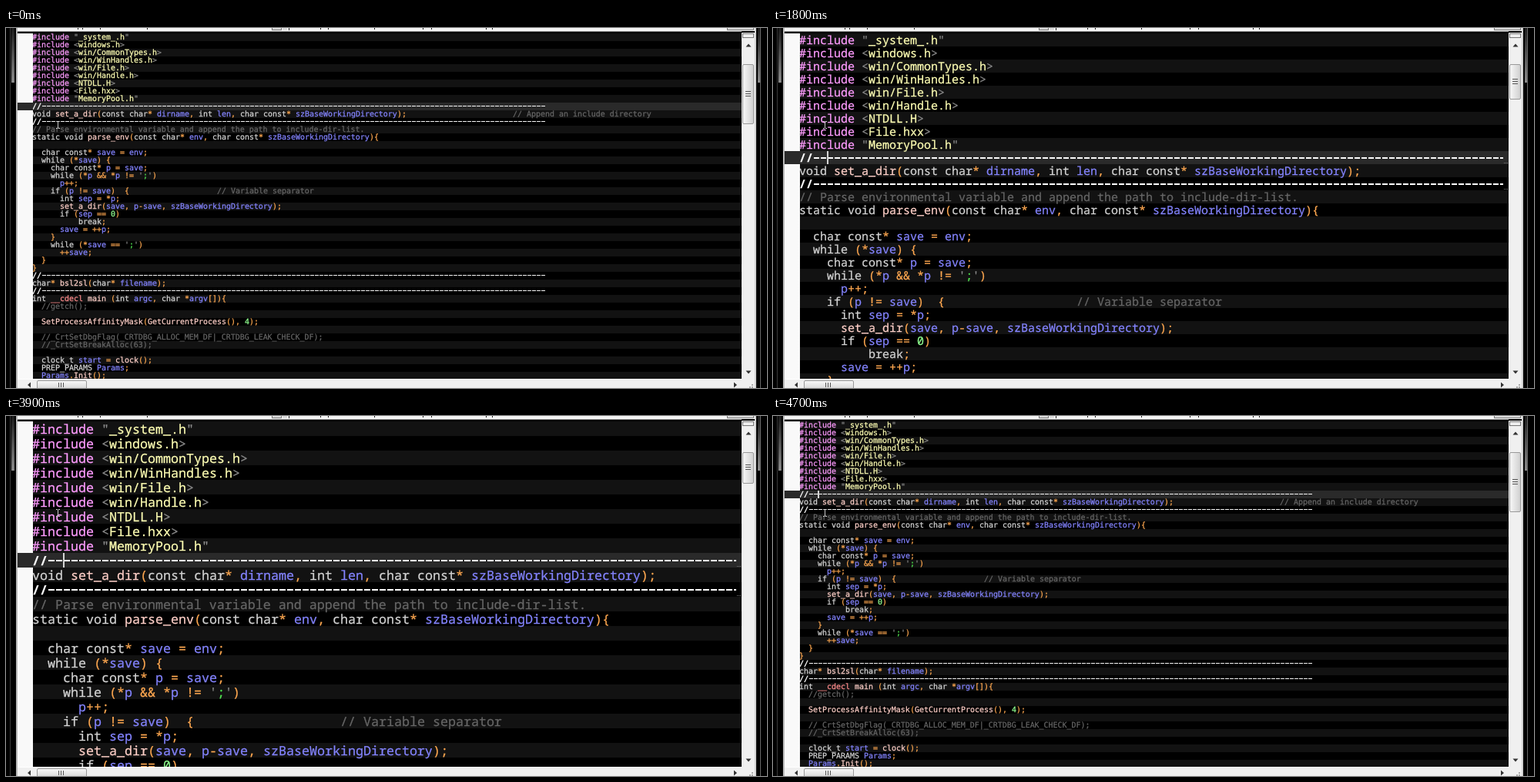
Recreate the animation shown at these times as an HTML page. Size 988 px wide and 468 px high, loop 5200 ms.

```html
<!DOCTYPE html>
<html lang="en">
<head>
<meta charset="utf-8">
<title>Editor zoom</title>
<style>
html, body { margin: 0; width: 100%; height: 100%; overflow: hidden; background: #000; }
svg { display: block; }
text { white-space: pre; text-rendering: geometricPrecision; }
tspan { fill: currentColor; stroke: currentColor; stroke-width: .25px; }
.grid { font-family: "DejaVu Sans Mono", monospace; }
.smooth { font-family: "Noto Sans Mono", monospace; }
.rule { color: #fff; font-weight: bold; }
.note { color: #666; }
.pre { color: #ff9cff; }
.path { color: #ffffb4; }
.edge { color: #8a8a8a; }
.chr { color: #50e650; }
.num { color: #90ff90; }
.key { color: #d4d4d4; }
.fn { color: #ffd0c8; }
.attr { color: #ff8c8c; }
.id { color: #8484ff; }
.op { color: #ffa850; }
</style>
</head>
<body>
<svg id="stage" width="988" height="468" viewBox="0 0 988 468">
  <defs>
    <clipPath id="page"><rect x="35" y="7" width="920" height="449"/></clipPath>
    <clipPath id="words"><rect x="35" y="7" width="913" height="449"/></clipPath>
    <linearGradient id="glass" x2="0" y2="1">
      <stop offset="0" stop-color="#1a1a1a"/><stop offset="1" stop-color="#8a8a8a"/>
    </linearGradient>
    <linearGradient id="thumbV"><stop offset="0" stop-color="#f8f8f8"/><stop offset="1" stop-color="#cfcfcf"/></linearGradient>
    <linearGradient id="thumbH" x2="0" y2="1"><stop offset="0" stop-color="#f8f8f8"/><stop offset="1" stop-color="#cfcfcf"/></linearGradient>
    <pattern id="dots" width="2" height="2" patternUnits="userSpaceOnUse">
      <rect width="2" height="2" fill="#fff"/><path d="M0 0h1v1h-1zM1 1h1v1h-1z" fill="#f3f3f3"/>
    </pattern>
  </defs>
  <rect width="988" height="468"/>
  <g id="chrome"></g>
  <g id="views"></g>
  <rect id="caret" width="2" fill="#d5d5d5"/>
  <path d="M65 121.5h2m1 0h2M67.5 122v8M65 130.5h2m1 0h2" stroke="#c8c8c8" fill="none"/>
</svg>
<script>
const NS = "http://www.w3.org/2000/svg";
const LEFT = 34, TOP = 7, CURRENT = 9, LOOP = 5200;
const $ = id => document.getElementById(id);

function add(parent, tag, attrs, text) {
  const el = document.createElementNS(NS, tag);
  for (const k in attrs) el.setAttribute(k, attrs[k]);
  if (text !== undefined) el.textContent = text;
  return parent.appendChild(el);
}
const box = (parent, x, y, width, height, fill, more) =>
  add(parent, "rect", { x, y, width, height, fill, ...more });

const rule = "//" + "-".repeat(109);
const code = `#include "_system_.h"
#include <windows.h>
#include <win/CommonTypes.h>
#include <win/WinHandles.h>
#include <win/File.h>
#include <win/Handle.h>
#include <NTDLL.H>
#include <File.hxx>
#include "MemoryPool.h"
${rule}
${"void set_a_dir(const char* dirname, int len, char const* szBaseWorkingDirectory);".padEnd(104)}// Append an include directory
${rule}
// Parse environmental variable and append the path to include-dir-list.
static void parse_env(const char* env, char const* szBaseWorkingDirectory){

  char const* save = env;
  while (*save) {
    char const* p = save;
    while (*p && *p != ';')
      p++;
${"    if (p != save)  {".padEnd(40)}// Variable separator
      int sep = *p;
      set_a_dir(save, p-save, szBaseWorkingDirectory);
      if (sep == 0)
          break;
      save = ++p;
    }
    while (*save == ';')
      ++save;
  }
}
${rule}
char* bsl2sl(char* filename);
${rule}
int __cdecl main (int argc, char *argv[]){
  //getch();

  SetProcessAffinityMask(GetCurrentProcess(), 4);

  //_CrtSetDbgFlag(_CRTDBG_ALLOC_MEM_DF|_CRTDBG_LEAK_CHECK_DF);
  //_CrtSetBreakAlloc(63);

  clock_t start = clock();
  PREP_PARAMS Params;
  Params.Init();`.split("\n");

const keywords = /^(void|const|char|int|static|while|if|break|clock_t|PREP_PARAMS)$/;
const pieces = /\/\/.*|#\w+|<[\w\/.]+>|"[^"]*"|'[^']*'|\d+|\w+|[^\s\w]+?(?=[\s\w\/"']|$)/g;

function kind(word, rest) {
  if (word.startsWith("//")) return "note";
  if (word[0] === "#") return "pre";
  if (/^\d/.test(word)) return "num";
  if (!/^\w/.test(word)) return "op";
  if (keywords.test(word)) return "key";
  if (word === "__cdecl") return "attr";
  return /^ ?\(/.test(rest) ? "fn" : "id";
}

// Splits a line into [column, text, class]
function tokens(line) {
  if (line === rule) return [[0, "//", "rule"]];
  const out = [];
  for (const m of line.matchAll(pieces)) {
    const word = m[0], at = m.index, end = word.length - 1;
    if (end > 1 && /^[<"']/.test(word)) {
      out.push([at, word[0], "edge"],
               [at + 1, word.slice(1, -1), word[0] === "'" ? "chr" : "path"],
               [at + end, word[end], "edge"]);
    } else out.push([at, word, kind(word, line.slice(at + word.length))]);
  }
  return out;
}
const parsed = code.map(tokens);

// Character width, line height, baseline offset, font
const levels = [
  [6, 10, 8, "grid"],
  [7, 13, 10, "smooth"],
  [8, 15, 12, "smooth"],
  [9, 17, 14, "smooth"],
  [10, 19, 16, "smooth"],
  [12, 20, 16, "grid"]
];

// The dashes that follow the two slashes of a divider
function dashes(parent, w, y) {
  const dash = Math.round(w * .75), thick = w < 8 ? 1 : 2;
  add(parent, "path", {
    d: `M${LEFT + 2 * w + 1} ${y + thick / 2}H${LEFT + rule.length * w}`,
    stroke: "#fff", "stroke-width": thick, "stroke-dasharray": `${dash} ${w - dash}`
  });
}

function buildView([w, h, base, font]) {
  const g = add($("views"), "g", { class: font });
  const page = add(g, "g", { "clip-path": "url(#page)" });
  const size = w / (font === "grid" ? 0.602 : 0.6);
  const text = add(g, "g", { "clip-path": "url(#words)", "font-size": size });
  const rows = Math.ceil(449 / h);
  for (let i = 0; i < rows; i++) {
    const y = TOP + i * h;
    if (i % 2 === 0) box(page, 35, y, 920, h, "#121212");
    if (i === CURRENT) {
      box(page, 35, y, 920, h, "#2a2a2a");
      box(g, 15, y, 20, h, "#2a2a2a");
    }
    const line = add(text, "text", { y: y + base });
    for (const [col, word, cls] of parsed[i] || [])
      add(line, "tspan", { x: LEFT + col * w, class: cls }, word);
    if (code[i] === rule) dashes(text, w, y + Math.floor(base * .6));
    const cut = Math.floor((948 - LEFT) / w);
    if (code[i] && code[i].length > cut && code[i][cut] !== " ")
      for (let x = 949; x < 955; x += 2) box(page, x, y + h - 2, 1, 1, "#777");
  }
  const len = Math.round(780 / h), mid = 47 + (len >> 1);
  box(g, 956.5, 47.5, 14, len - 1, "url(#thumbV)", { rx: 1.5, stroke: "#999" });
  for (const d of [-4, -1, 2]) box(g, 960, mid + d, 7, 1, "#555");
  return g;
}

function buildChrome() {
  const g = $("chrome");
  box(g, 5, 0, 1, 468, "#3a3a3a");
  box(g, 7, 0, 4, 71, "url(#glass)");
  box(g, 13, 0, 2, 468, "#b8b8b8");
  box(g, 972, 0, 2, 468, "#d0d0d0");
  box(g, 976, 0, 4, 71, "url(#glass)");
  box(g, 979, 0, 1, 468, "#666");
  box(g, 15, 0, 957, 4, "#f4f4f4");
  box(g, 15, 4, 940, 1, "#888");
  box(g, 359, 0, 6, 3, "#ddd");
  box(g, 367, 0, 1, 3, "#222");
  for (const [x, w] of [[345, 12], [936, 34]])
    box(g, x + .5, -3.5, w, 6, "#ddd", { stroke: "#777" });
  for (const x of [93, 99, 122, 183, 408, 418, 478, 541, 552, 623, 631])
    box(g, x, 0, 1, 2, "#222");
  box(g, 15, 7, 20, 449, "url(#dots)");
  box(g, 955, 6, 17, 462, "#f0f0f0");
  box(g, 956.5, 7.5, 14, 5, "#eee", { stroke: "#777" });
  box(g, 15, 456, 957, 12, "#f0f0f0");
  box(g, 15, 456, 940, 1, "#fff");
  box(g, 40.5, 458.5, 64, 14, "url(#thumbH)", { rx: 1.5, stroke: "#999" });
  for (const x of [68, 71, 74]) box(g, x, 461, 1, 6, "#555");
  add(g, "path", {
    d: "M964 20.5l3.5 4h-7zM964 449.5l3.5-4h-7zM28 464l4-3.5v7zM949 464l-4-3.5v7z",
    fill: "#333"
  });
  for (const [x, y] of [[968, 463], [965, 466], [968, 466]]) box(g, x, y, 2, 2, "#aaa");
}

buildChrome();
const views = levels.map(buildView);
const caret = $("caret");

function zoomAt(t) {
  if (t < 1400) return 0;
  if (t < 2200) return 1 + Math.floor((t - 1400) / 200);
  if (t < 3900) return 5;
  return Math.max(0, 4 - Math.floor((t - 3900) / 200));
}
const hidden = [[0, 500], [1000, 1200], [2400, 2900], [3400, 3900]];

function draw(t) {
  const level = zoomAt(t), [w, h] = levels[level];
  views.forEach((v, i) => v.setAttribute("display", i === level ? "inline" : "none"));
  const off = hidden.some(([a, b]) => t >= a && t < b);
  caret.setAttribute("display", off ? "none" : "inline");
  caret.setAttribute("x", LEFT + 4 * w);
  caret.setAttribute("y", TOP + CURRENT * h);
  caret.setAttribute("height", h);
}

const start = performance.now();
function tick() {
  draw((performance.now() - start) % LOOP);
  requestAnimationFrame(tick);
}
draw(0);
tick();
</script>
</body>
</html>
```
